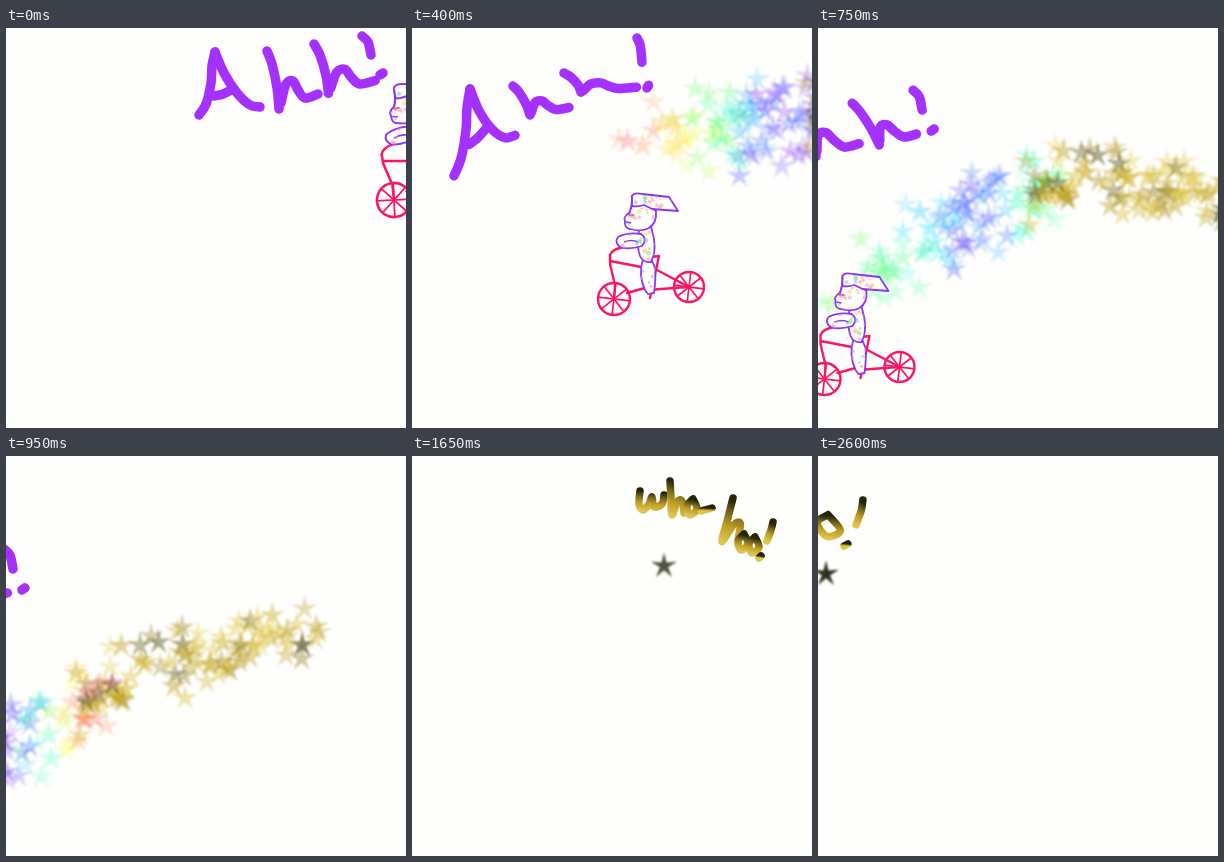
Recreate the animation shown at these times as an HTML page. Size 400 px wide and 400 px high, loop 2.65 s.

```html
<!DOCTYPE html>
<html lang="en">
<head>
<meta charset="utf-8">
<title>Bunny ride</title>
<style>
html, body { margin: 0; width: 100%; height: 100%; overflow: hidden; background: #fefefc; }
svg { display: block; width: 100vw; height: 100vh; }
.line { fill: none; stroke-linecap: round; stroke-linejoin: round; }
</style>
</head>
<body>
<svg viewBox="0 0 400 400">
  <defs>
    <linearGradient id="gold" x1="0.15" y1="0" x2="0" y2="1">
      <stop offset="0" stop-color="#26250a"/>
      <stop offset="0.28" stop-color="#75651a"/>
      <stop offset="0.6" stop-color="#bd9c25"/>
      <stop offset="1" stop-color="#dec64e"/>
    </linearGradient>
    <filter id="soft" x="-20%" y="-20%" width="140%" height="140%"><feGaussianBlur stdDeviation="0.8"/></filter>
    <clipPath id="skin"></clipPath>
  </defs>
  <g id="trail" filter="url(#soft)"></g>
  <g id="rider">
    <g id="bike" class="line" stroke="#fb1663" stroke-width="2.4"></g>
    <g id="bunny" fill="#fefefc" stroke="#8c35f5" stroke-width="1.8" stroke-linejoin="round"></g>
  </g>
  <g id="shout" class="line" stroke="#a531ff" stroke-width="9.5"></g>
  <g id="whee" class="line" stroke="url(#gold)" stroke-width="7.5"></g>
  <g id="hoo" class="line" stroke="url(#gold)" stroke-width="7.5"></g>
  <g id="lone" filter="url(#soft)"></g>
</svg>
<script>
const LOOP = 2650, STEP = 50;
const $ = id => document.getElementById(id);
const lerp = (a, b, k) => a + (b - a) * k;
const clamp = (v, a, b) => Math.min(b, Math.max(a, v));
const show = (id, on) => { $(id).style.display = on ? '' : 'none'; };

function add(parent, tag, attrs) {
  const el = document.createElementNS('http://www.w3.org/2000/svg', tag);
  for (const k in attrs) el.setAttribute(k, attrs[k]);
  parent.appendChild(el);
  return el;
}

let seed = 11;
function rnd() {
  seed = (seed * 16807) % 2147483647;
  return seed / 2147483647;
}
const pick = list => list[Math.floor(rnd() * list.length)];

// keys: [time, ...values], linear in between
function track(t, keys) {
  let i = 0;
  while (i < keys.length - 2 && t > keys[i + 1][0]) i++;
  const a = keys[i], b = keys[i + 1];
  const k = clamp((t - a[0]) / (b[0] - a[0]), 0, 1);
  return a.slice(1).map((v, j) => lerp(v, b[j + 1], k));
}

// smooth line through the points
function curve(p) {
  let d = `M${p[0]}`;
  for (let i = 0; i < p.length - 1; i++) {
    const a = p[i - 1] || p[i], b = p[i], c = p[i + 1], e = p[i + 2] || c;
    d += `C${b[0] + (c[0] - a[0]) / 6} ${b[1] + (c[1] - a[1]) / 6} ` +
         `${c[0] - (e[0] - b[0]) / 6} ${c[1] - (e[1] - b[1]) / 6} ${c[0]} ${c[1]}`;
  }
  return d;
}

// "x,y x,y | x,y ..." -> list of strokes
const parse = s => s.split('|').map(q => q.trim().split(' ').map(p => p.split(',').map(Number)));

// pose: origin, then a 2x2 matrix
const place = (pts, [x, y, a, b, c, d]) => pts.map(([u, v]) => [x + a * u + b * v, y + c * u + d * v]);

// --- star trail ---
const STAR = Array.from({ length: 10 }, (_, i) => {
  const r = i % 2 ? 4.3 : 13.5, a = (i / 5 - 0.5) * Math.PI;
  return `${(r * Math.cos(a)).toFixed(1)},${(r * Math.sin(a)).toFixed(1)}`;
}).join(' ');

const GOLDS = ['#c8a81c', '#b79a18', '#d8bc38', '#e3cb4c', '#8a7616', '#45410f'];
const stars = [];
function addStar(u, gold) {
  const el = add($('trail'), 'polygon', {
    points: STAR,
    'fill-opacity': gold ? 0.3 + rnd() * 0.14 : 0.16 + rnd() * 0.12
  });
  if (gold) el.setAttribute('fill', pick(GOLDS));
  const spread = gold ? 50 - (u - 3) * 6 : 30 + Math.min(u, 2) * 13;
  stars.push({ el, u, gold, dx: (rnd() - 0.5) * 34, dy: (rnd() + rnd() - 1) * spread, tint: (rnd() - 0.5) * 45 });
}
for (let i = 0; i < 100; i++) addStar(3.2 * rnd() ** 0.8, false);
for (let i = 0; i < 95; i++) addStar(2.95 + 3.1 * rnd() ** 1.15, true);

// head x, head y, spacing, slope, bend
const TRAIL = [
  [0, 462, 46, 60, -13, 0.8], [400, 222, 116, 60, -13, 0.8], [600, 148, 178, 57, -52, 8.7],
  [950, -150, 414, 76, -73.5, 5.75], [1200, -520, 509, 76, -73.5, 5.75]
];

function drawTrail(t) {
  show('trail', t < 1200);
  const [hx, hy, gap, slope, bend] = track(t, TRAIL);
  const turn = clamp((t - 600) / 350, 0, 1);
  for (const s of stars) {
    const x = hx + gap * s.u + s.dx;
    const y = hy + slope * s.u + bend * s.u * s.u + s.dy;
    s.el.setAttribute('transform', `translate(${x.toFixed(1)} ${y.toFixed(1)})`);
    if (s.gold) continue;
    const out = clamp(250 * (s.u / 2.2) ** 1.3, 0, 250);
    const back = clamp(270 * (3 - s.u), 0, 260);
    s.el.setAttribute('fill', `hsl(${lerp(out, back, turn) + s.tint} 100% 58%)`);
  }
}

// --- rider, drawn around the front hub ---
function wheel(x, y, r) {
  add($('bike'), 'circle', { cx: x, cy: y, r });
  for (let i = 0; i < 4; i++) {
    const a = i * Math.PI / 4 + 0.12, c = r * Math.cos(a), s = r * Math.sin(a);
    add($('bike'), 'path', { d: `M${x - c} ${y - s}L${x + c} ${y + s}`, 'stroke-width': 1.7 });
  }
}
wheel(0, 0, 16);
wheel(75, -12, 15);
add($('bike'), 'path', { d: 'M10-52Q-2-50-4-44L-4-35L1-14L0 0M-4-38L43-29L75-12M13-6L38-13M34-9L60-11L75-12M37-42L45-43L42-29L36-1' });

// leg, body, head, ear, arm
const SKIN = [
  'M29-40Q24-24 31-9L34-5L40-6Q42-20 41-31L37-41Z',
  'M25-69Q22-55 26-43Q29-36 37-37Q42-46 40-60L37-73Z',
  'M18-103Q18-91 15-86Q9-82 11-78Q10-71 16-70Q28-67 35-71Q43-76 42-88L32-96Z',
  'M18-103Q20-107 28-105L55-102L64-88L38-90L30-94Q24-92 18-93Z',
  'M4-62Q14-67 27-65Q34-60 28-53Q14-49 6-52Q0-57 4-62Z'
];
for (const d of SKIN) {
  add($('skin'), 'path', { d });
  add($('bunny'), 'path', { d });
}
add($('bunny'), 'path', { d: 'M18-94L15-84L20-84M12-77L17-76M10-57Q18-60 24-57', fill: 'none', 'stroke-width': 1.5 });
const PASTEL = ['#ff8a8a', '#ffb35c', '#7fe08a', '#7fb2ff', '#f3dc6a', '#f09ae0'];
const dabs = add($('rider'), 'g', { 'clip-path': 'url(#skin)' });
for (let i = 0; i < 150; i++) {
  add(dabs, 'circle', {
    cx: 2 + rnd() * 58, cy: -104 + rnd() * 100, r: 1 + rnd() * 1.6,
    fill: pick(PASTEL), 'fill-opacity': 0.55
  });
}

function drawRider(t) {
  show('rider', t < 950);
  const [x, y, r, s] = track(t, [
    [0, 388, 172, -10, 1.07], [400, 202, 271, 0, 1], [600, 127, 312, 0, 1], [900, -114, 390, 0, 1]
  ]);
  $('rider').setAttribute('transform', `translate(${x} ${y}) rotate(${r}) scale(${s})`);
}

// --- purple shout: each letter hangs from its top ---
const BIG = {
  A: parse('-16,63 -9,52 -4,31 -3,14 0,0|0,0 9,21 22,41 35,53 45,55|-1,44 8,42 16,38'),
  h: parse('0,0 5,13 10,37 12,58|14,52 19,33 26,30 31,39 38,47 51,43'),
  '!': parse('0,0 6,6 9,19|18,39 21,37')
};
const SHOUT = [
  ['A', [0, 209, 24, 1, 0, 0, 1], [400, 58, 61, 1, 0, -0.5, 1.25], [600, -3, 72, 1.1, 0, -0.1, 0.85]],
  ['h', [0, 261, 23, 1, 0, 0, 1], [400, 101, 58, 1.03, 0.08, 0, 0.5], [600, 42, 56, 1.2, 0.25, 0, 0.85]],
  ['h', [0, 308, 16, 1.2, 0, 0, 0.85], [400, 152, 45, 1.42, 0, 0, 0.33], [600, 107, 52, 1.05, 0.25, 0, 0.72]],
  ['!', [0, 356, 8, 1, 0, 0, 1], [400, 225, 10, 0.55, 0, 0, 1.28], [600, 168, 39, 1, 0, 0, 1.05]]
].map(([ch, ...keys]) => ({
  keys,
  parts: BIG[ch].map(pts => ({ pts, el: add($('shout'), 'path', {}) }))
}));

function drawShout(t) {
  show('shout', t < 1050);
  const [ox, oy] = track(t, [[600, 0, 0], [950, -170, 54], [1050, -219, 69]]);
  $('shout').setAttribute('transform', `translate(${ox} ${oy})`);
  for (const { keys, parts } of SHOUT) {
    const pose = track(t, keys);
    for (const { pts, el } of parts) el.setAttribute('d', curve(place(pts, pose)));
  }
}

// --- gold words ---
const SMALL = {
  w: parse('0,0 -1,13 3,19 9,13 12,6 14,16 22,13 24,4'),
  h: parse('0,0 1,17 2,34 7,21 12,20 14,32'),
  e: parse('0,0 9,-5 11,-12 4,-12 1,-2 7,6 17,2'),
  o: parse('0,0 -6,7 -3,16 4,10 0,0'),
  '-': parse('0,0 11,-3'),
  '!': parse('0,0 -2,8 -6,19|-14,36 -12,34')
};
// letters: character, x, y, size, lean
const write = (id, letters) => letters.flatMap(([ch, x, y, s = 1, lean = 0]) =>
  SMALL[ch].map(q => {
    const pts = place(q, [x, y, s, lean, 0, s]);
    return { pts, el: add($(id), 'path', { d: curve(pts) }) };
  }));

// whee is laid out around the star, hoo around its last letter
write('whee', [['w', -39, -71, 1.1], ['h', -8, -87, 1.15, 0.18], ['e', 19, -55], ['e', 38, -57], ['-', 59, -62]]);
const hoo = write('hoo', [
  ['w', -113, -53], ['h', -83, -63], ['o', -60, -45], ['-', -52, -33],
  ['h', -20, -46, 1.28, -0.4], ['o', -9, -10], ['o', 2, -7], ['!', 20, -22]
]);
const lone = add($('lone'), 'polygon', { points: STAR, fill: '#26260f' });

function drawGold(t) {
  const on = t >= 1150, swap = t >= 1600;
  show('lone', on);
  show('whee', on && !swap);
  show('hoo', swap);
  const [x, y, alpha] = track(t, [
    [1100, 410, 172, 0.62], [1250, 320, 155, 0.68], [1650, 252, 110, 0.8],
    [2050, 184, 143, 0.92], [2350, 80, 168, 0.95], [2600, 8, 118, 0.96]
  ]);
  lone.setAttribute('transform', `translate(${x} ${y})`);
  lone.setAttribute('fill-opacity', alpha);
  $('whee').setAttribute('transform', `translate(${x} ${y})`);
  const pose = track(t, [
    [1650, 341, 88, 1, 0, 0, 1], [2050, 273, 131, 1, 0, 0, 1], [2200, 191, 161, 0.82, 0, 0.3, 1],
    [2350, 133, 180, 1.2, 0.1, 0.32, 1.15], [2600, 8, 68, 2.22, 0.34, 0.36, 1.42]
  ]);
  for (const { pts, el } of hoo) el.setAttribute('d', curve(place(pts, pose)));
}

function draw(ms) {
  const t = Math.floor((ms % LOOP) / STEP) * STEP;
  drawTrail(t);
  drawRider(t);
  drawShout(t);
  drawGold(t);
}

let start = null;
function tick(now) {
  if (start === null) start = now;
  draw(now - start);
  requestAnimationFrame(tick);
}
draw(0);
requestAnimationFrame(tick);
</script>
</body>
</html>
```
